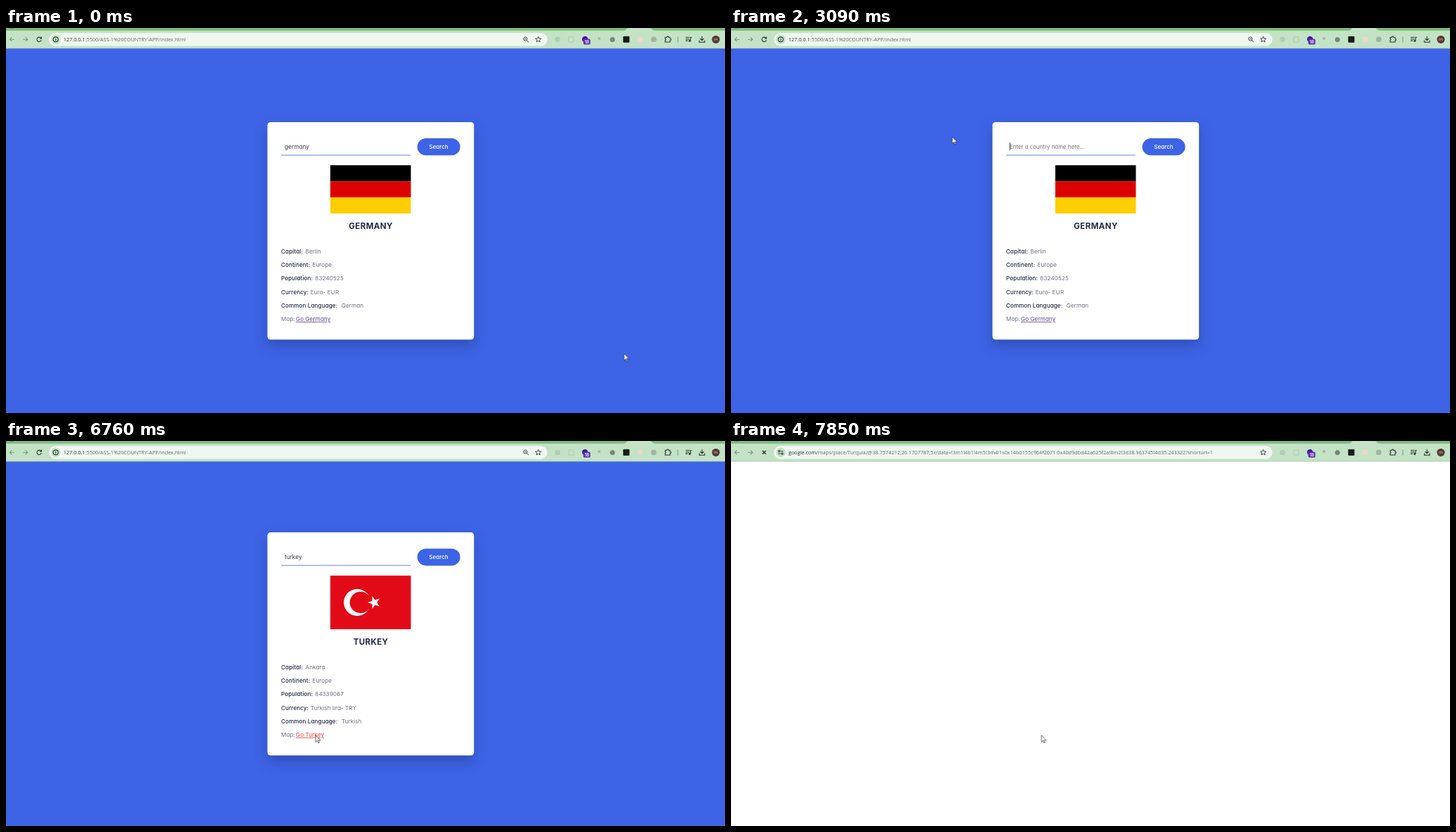
Write an HTML page that moves like this. It is 1022 by 548 pixels and loops after 8000 ms.

```html
<!DOCTYPE html>
<html lang="en">
<head>
<meta charset="utf-8">
<title>Country search</title>
<style>
  html, body { margin: 0; width: 100%; height: 100%; overflow: hidden; background: #c4e2c6; }
  svg { display: block; width: 1022px; height: 548px; }
  text { white-space: pre; }
  .page { font: 8.1px Inter, sans-serif; font-feature-settings: "cv11"; fill: #6f7083; }
  .row { letter-spacing: .1px; }
  .label { font-weight: 500; fill: #222a43; }
  .title { font-size: 11.5px; font-weight: 700; letter-spacing: .4px; fill: #222a43; text-anchor: middle; }
  .typed { font-size: 8.3px; fill: #373759; }
  .hint { font-size: 7.9px; fill: #75757f; }
  .button { font-weight: 500; fill: #fff; text-anchor: middle; }
  .link { fill: #60418c; text-decoration: underline; }
  .card { fill: #fff; filter: drop-shadow(0 9px 9px rgba(8, 21, 65, .27)); }
  .url { font: 7.3px "Open Sans", sans-serif; fill: #5d6b60; }
  .host { fill: #26352a; }
  .icon { fill: none; stroke: #26352a; stroke-width: 1.1; }
  .selection { transform-origin: 432.5px 169px; animation: select 8s infinite linear; }
  #mouse { animation: move 8s infinite ease-in-out; }

  @keyframes select {
    0%, 14.9% { transform: scaleX(0); }
    16.5%, 100% { transform: scaleX(1); }
  }
  @keyframes move {
    0% { transform: translate(878.5px, 463.5px); }
    1.25% { transform: translate(878.5px, 463.5px); animation-timing-function: cubic-bezier(.35, .1, .3, 1); }
    11%, 12.1% { transform: translate(549px, 174.7px); }
    14.9% { transform: translate(437px, 170px); }
    19% { transform: translate(304px, 157px); }
    20.9%, 24.8% { transform: translate(312px, 155px); }
    26%, 59.4% { transform: translate(314.5px, 155px); }
    66.5%, 73% { transform: translate(601.3px, 167.5px); }
    80.5% { transform: translate(443px, 425px); }
    83% { transform: translate(440.2px, 419px); }
    95.875% { transform: translate(440.2px, 419px); animation-timing-function: step-start; }
    95.9%, 100% { transform: translate(441.3px, 418.7px); }
  }
</style>
</head>
<body>
<svg viewBox="0 0 1022 548">
  <rect width="1022" height="548" fill="#c4e2c6"/>
  <rect width="1022" height="3.8" fill="#7bbd7d"/>
  <path d="M876 4C883 4 881 0 885 0H914C919 0 917 4 925 4Z" fill="#c4e2c6"/>
  <path d="M5 0H11" stroke="#4c7b50"/>

  <g class="icon">
    <path d="M12 16.2H5.4M8.4 13.2L5.4 16.2 8.4 19.2M24 16.2H30.6M27.6 13.2L30.6 16.2 27.6 19.2" stroke="#789a7b"/>
    <path data-on="0-6940" d="M49.6 14.3A3.2 3.2 0 1 0 50.2 17M50.4 12.6V15H48"/>
    <path data-on="6940-8000" d="M44.6 13.8L49.6 18.8M49.6 13.8L44.6 18.8" stroke-width="1.3"/>
  </g>

  <rect x="61" y="7" width="708.5" height="18.5" rx="9.25" fill="#eff8f0"/>
  <circle cx="70.7" cy="16.2" r="6.8" fill="#c4e2c6"/>
  <g class="icon">
    <g data-on="0-7670">
      <circle cx="70.7" cy="16.2" r="3.5"/>
      <path d="M70.7 15.7V18.3M70.7 13.9V14.9"/>
    </g>
    <g data-on="7670-8000">
      <path d="M71 14.5H74.2M67.2 18H70.4"/>
      <circle cx="68.6" cy="14.5" r="1.2"/><circle cx="72.8" cy="18" r="1.2"/>
    </g>
    <g data-on="0-6940" stroke-width=".9">
      <circle cx="738.2" cy="15.4" r="2.6"/>
      <path d="M740.1 17.3L743 20.2M737 15.4H739.4"/>
    </g>
    <path id="star" stroke-width=".9"/>
  </g>
  <g class="url">
    <text data-on="0-6940" x="81.7" y="18.9"><tspan class="host">127.0.0.1</tspan>:5500/ASS-1%20COUNTRY-APP/index.html</text>
    <text data-on="6940-7670" x="81.7" y="18.9">about:<tspan class="host">blank</tspan></text>
    <text data-on="7670-8000" x="81.7" y="18.9"><tspan class="host">google.com</tspan>/maps/place/Turquía/@38.7574212,26.1707787,5z/data=!3m1!4b1!4m5!3m4!1s0x14b0155c964f2671:0x40d9dbd42a625f2a!8m2!3d38.963745!4d35.243322?shorturl=1</text>
  </g>

  <circle data-on="0-6940 7730-8000" cx="784" cy="16.3" r="3.8" fill="#b3cdb5"/>
  <rect data-on="6940-7730" x="780.2" y="12.6" width="7.6" height="7.4" fill="#b4b866"/>
  <rect x="799.8" y="12.8" width="7.2" height="7.2" fill="none" stroke="#9dba9f" stroke-dasharray="1.2 1"/>
  <circle cx="823" cy="16" r="4.2" fill="#4317a3"/>
  <g data-on="0-6940 7730-8000">
    <rect x="820.7" y="15.6" width="9.8" height="8" rx="1.6" fill="#5b30ae"/>
    <text x="825.6" y="21.9" text-anchor="middle" font-family="Inter, sans-serif" font-size="6" font-weight="600" fill="#fff">18</text>
  </g>
  <circle cx="843" cy="15" r="2" fill="#a3b9a5"/>
  <circle cx="862" cy="16.4" r="3.5" fill="#778579"/>
  <rect x="877.2" y="11.8" width="9" height="9" rx="1" fill="#171b19"/>
  <rect x="897.6" y="12.7" width="7.6" height="7.2" fill="#e6d9ca"/>
  <circle cx="920.7" cy="16.2" r="3.9" fill="#9db8a0"/>
  <g class="icon">
    <path d="M937 13.2H939.2A1.3 1.3 0 0 1 941.8 13.2H944V15.2A1.3 1.3 0 0 1 944 17.8V20H937V17.6A1.2 1.2 0 0 0 937 15.3Z"/>
    <path d="M955 12.2V20.5" stroke="#78a67c"/>
    <path d="M966 13.3H971.5M966 15.7H971.5M966 18.1H969M973 18.3V13.2H974.8"/>
    <circle cx="971.8" cy="18.3" r="1" fill="#26352a"/>
    <path d="M989.3 11.8V17.4M986.6 14.9L989.3 17.6 992 14.9M985.5 17.5V20.2H993.1V17.5"/>
  </g>
  <circle cx="1009" cy="16.3" r="5.6" fill="#593a37"/>
  <text x="1009" y="18.1" text-anchor="middle" font-family="Open Sans, sans-serif" font-size="6" fill="#e5d6d4">m</text>
  <path d="M0 29H1022" stroke="#a8c8ab"/>

  <g class="page" data-on="0-6940">
    <rect y="29.3" width="1022" height="519" fill="#3d64e6"/>
    <g id="germany" data-on="0-5490"></g>
    <g id="turkey" data-on="5490-6940"></g>
  </g>
  <rect data-on="7670-8000" y="29.5" width="1022" height="519" fill="#fff"/>

  <g id="mouse">
    <circle data-on="1190-1540 5330-5490 6700-6760" cx=".5" cy=".8" r="6.7" fill="#c9bd43" opacity=".75"/>
    <path data-on="0-790 1560-8000" d="M0 0V9.6L2.2 7.6 3.7 11 5.2 10.4 3.7 7.1H6.8Z" fill="#fff" stroke="#20242e" stroke-width=".7"/>
    <path data-on="790-1560" d="M-1.8-4.4H-.6L0-3.9.6-4.4H1.8M0-4V4M-1.8 4.4H-.6L0 3.9.6 4.4H1.8" fill="none" stroke="#222" stroke-width=".9"/>
  </g>
</svg>
<script>
  const LOOP = 8000;
  const byId = id => document.getElementById(id);

  function starPath(cx, cy, outer, inner, turn) {
    const points = Array.from({ length: 10 }, (_, i) => {
      const angle = turn + i * Math.PI / 5;
      const radius = i % 2 ? inner : outer;
      return `${(cx + radius * Math.cos(angle)).toFixed(2)} ${(cy + radius * Math.sin(angle)).toFixed(2)}`;
    });
    return `M${points.join('L')}Z`;
  }

  const typed = (text, on, extra = '') =>
    `<text class="typed" data-on="${on}" x="396" y="171.6" ${extra}>${text}</text>`;
  const caret = (x, on) =>
    `<rect data-on="${on}" x="${x}" y="163" width=".8" height="11" fill="#222"/>`;

  // Shift moves the search bar up and the details down as the flag grows.
  function card({ name, shift, flag, field, link, values }) {
    const labels = ['Capital:', 'Continent:', 'Population:', 'Currency:', 'Common Language:'];
    const valueX = [425.5, 435.5, 439.3, 432.8, 476.8];
    const rowY = i => 320.8 + shift + i * 19.27;
    const rows = labels.map((label, i) =>
      `<text class="row label" x="391" y="${rowY(i)}">${label}</text>
       <text class="row" x="${valueX[i]}" y="${rowY(i)}">${values[i]}</text>`).join('');
    return `
      <rect class="card" x="371.6" y="${134 - shift}" width="293.6" height="${309.6 + 2 * shift}" rx="4.5"/>
      <g transform="translate(0 ${-shift})">
        <path d="M391 181H575" stroke="#6481e8"/>
        ${field}
        <rect x="584.6" y="157.1" width="61" height="24.2" rx="12.1" fill="#3d64e6"/>
        <text class="button" x="615" y="171.7">Search</text>
      </g>
      ${flag}
      <text class="title" x="518.5" y="${286.4 + shift}">${name.toUpperCase()}</text>
      ${rows}
      <text class="row" x="391" y="${rowY(5)}">Map:</text>
      <g transform="translate(412 ${rowY(5)})">${link}</g>`;
  }

  const stripes = ['#000', '#d00', '#ffce00'].map((color, i) =>
    `<rect x="461" y="${195.3 + i * 22.9}" width="114.5" height="22.9" fill="${color}"/>`).join('');

  byId('germany').innerHTML = card({
    name: 'Germany',
    shift: 0,
    flag: stripes,
    values: ['Berlin', 'Europe', '83240525', 'Euro- EUR', 'German'],
    link: '<text class="row link">Go Germany</text>',
    field: typed('germany', '0-2080')
      + `<g data-on="1190-2080"><rect class="selection" x="396" y="163" width="36.5" height="12" fill="#0078d7"/></g>`
      + typed('germany', '1310-2080', 'style="fill:#fff"')
      + typed('y', '2080-3090') + caret(400.2, '2080-2420 2830-3090')
      + '<text class="hint" data-on="3090-3250" x="396" y="171.6">Enter a country name here...</text>'
      + caret(396, '3090-3250')
      + typed('t', '3250-3590') + caret(399, '3250-3590')
      + typed('tu', '3590-3850') + caret(403.8, '3590-3850')
      + typed('tur', '3850-4100') + caret(406.8, '3850-4100')
      + typed('turk', '4100-4160') + caret(411.5, '4100-4160')
      + typed('turke', '4160-4220') + caret(416.2, '4160-4220')
      + typed('turkey', '4220-5490') + caret(420.5, '4220-4480 4980-5330')
  });

  byId('turkey').innerHTML = card({
    name: 'Turkey',
    shift: 3.9,
    flag: `<rect x="461" y="191.6" width="114.5" height="76.3" fill="#e30a17"/>
      <circle cx="499.2" cy="229.8" r="19.1" fill="#fff"/>
      <circle cx="504" cy="229.8" r="15.3" fill="#e30a17"/>
      <path d="${starPath(523.4, 229.8, 9.5, 3.65, Math.PI)}" fill="#fff"/>`,
    values: ['Ankara', 'Europe', '84339067', 'Turkish lira- TRY', 'Turkish'],
    link: `<text class="row link" data-on="5490-6500">Go Turkey</text>
      <text class="row link" data-on="6500-6940" style="fill:#ee3a36">Go Turkey</text>`,
    field: typed('turkey', '5490-6940')
  });

  byId('star').setAttribute('d', starPath(756.6, 16.4, 4.3, 1.9, -Math.PI / 2));

  // Each data-on list of "start-end" times becomes a stepped opacity animation.
  const rules = new Map();
  for (const el of document.querySelectorAll('[data-on]')) {
    const spans = el.dataset.on;
    if (!rules.has(spans)) {
      const shown = el.getAttribute('opacity') || 1;
      const steps = spans.split(' ').map(span => {
        const [start, end] = span.split('-').map(ms => ms / LOOP * 100);
        const off = end < 100 ? `${end}% { opacity: 0 }` : '';
        return `${start}% { opacity: ${shown} } ${off}`;
      }).join(' ');
      const first = spans.startsWith('0-') ? '' : '0% { opacity: 0 }';
      const last = spans.endsWith(`-${LOOP}`) ? shown : 0;
      const name = `show${rules.size}`;
      rules.set(spans, `@keyframes ${name} { ${first} ${steps} 100% { opacity: ${last} } }
        [data-on="${spans}"] { animation: ${name} ${LOOP}ms step-end infinite }`);
    }
  }
  const sheet = document.createElement('style');
  sheet.textContent = [...rules.values()].join('\n');
  document.head.append(sheet);
</script>
</body>
</html>
```
